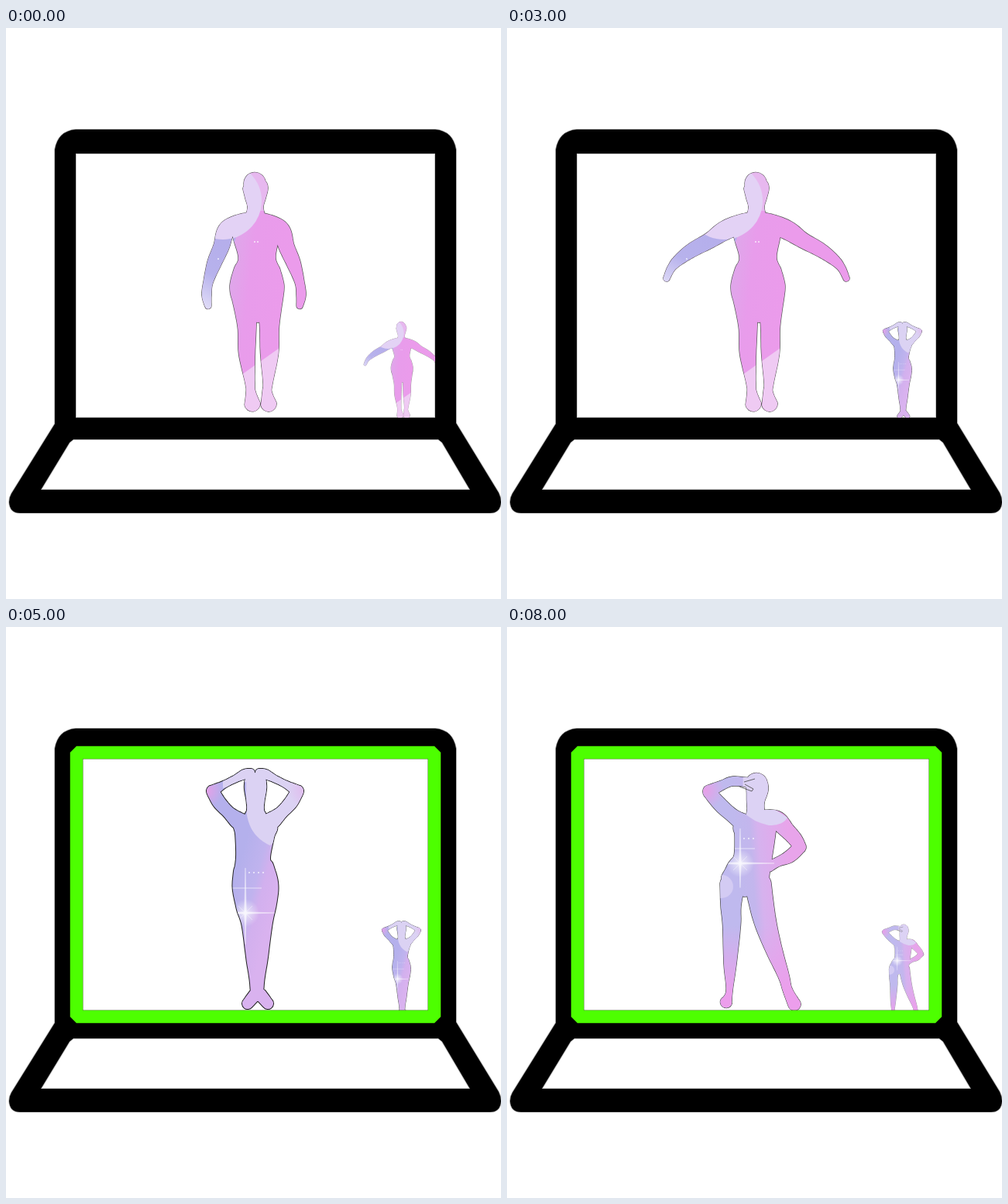
An HTML page that plays this animation: 639x737 px, repeating every 9 s.

```html
<!DOCTYPE html>
<html lang="en">
<head>
<meta charset="utf-8">
<style>
html, body { margin: 0; width: 100%; height: 100%; overflow: hidden; background: #fff; }
svg { display: block; }
</style>
</head>
<body>
<svg id="stage" width="639" height="737" viewBox="0 0 639 737"></svg>
<script>
// A limb is a few joints "x,y,radius"; its skin is swept along a spline through them.
const joints = text => text.trim().split(/\s+/).map(j => j.split(',').map(Number));
const mirror = (limb, axis) => limb.map(([x, y, r]) => [2 * axis - x, y, r]);
const pair = (text, axis) => [joints(text), mirror(joints(text), axis)];

function spline(pts, steps = 8) {
  const at = i => pts[Math.min(Math.max(i, 0), pts.length - 1)];
  const out = [];
  for (let n = 0; n <= (pts.length - 1) * steps; n++) {
    const i = Math.floor(n / steps), t = n / steps - i;
    const [a, b, c, d] = [at(i - 1), at(i), at(i + 1), at(i + 2)];
    out.push(b.map((v, k) => v + t / 2 * (c[k] - a[k] +
      t * (2 * a[k] - 5 * v + 4 * c[k] - d[k] + t * (3 * (v - c[k]) + d[k] - a[k])))));
  }
  return out;
}

function skin(limb) {
  const line = spline(limb), last = line.length - 1;
  const side = s => line.map(([x, y, r], i) => {
    const a = line[Math.max(i - 1, 0)], b = line[Math.min(i + 1, last)];
    const dir = Math.atan2(b[1] - a[1], b[0] - a[0]);
    return (x - s * r * Math.sin(dir)).toFixed(1) + ' ' + (y + s * r * Math.cos(dir)).toFixed(1);
  });
  const one = side(1), two = side(-1).reverse();
  const cap = (r, to) => `A${r} ${r} 0 0 0 ${to}`;
  return 'M' + one.join('L') + cap(line[last][2], two[0]) +
    'L' + two.join('L') + cap(line[0][2], one[0]) + 'Z';
}

const standing = [
  joints('321,200,14 322,207,16 322,220,13 322,232,10 322,245,14'),
  joints('322,240,10 322,252,28 323,268,30 324,296,24 324,312,30 324,335,35 325,356,29 325,372,8'),
  joints('308,345,17 311,385,12 311,420,10.5 315,458,6 316,470,6 318,485,10'),
  joints('341,345,17 340,385,12.5 340,420,11.5 338,458,6 337,470,6 339,485,10')
];
const lowered = [...standing,
  ...pair('318,247,10 298,254,12 284,262,11 278,282,10 269,303,9 261,328,6 259,345,6 261,359,4', 320)];
const spread = [...standing,
  ...pair('318,247,10 298,254,12 280,262,12 262,274,10 240,286,9 222,299,7 212,310,5 206,323,4', 322)];
const raised = [
  joints('322,202,14 322,210,14 322,225,11.5 322,236,11 322,245,14'),
  joints(`322,246,14 322,256,28 321,270,25 319,298,22 320,312,26 322,335,29.5 323,362,25.5
    324,385,19.5 324,430,13.5 324,455,9.5 324,474,8`),
  ...pair('312,256,12 300,250,11 287,239,8 275,226,8.5 267,212,8', 321.5),
  ...pair('266,212,7.5 282,203,4.5 296,196,4.5 308,190,6 316,188,5', 321.5),
  ...pair('322,474,8 312,486,7', 325)
];
const akimbo = [
  joints('322,202,14 323,210,14 321,224,11.5 321,236,11 321,246,13'),
  joints('322,246,13 320,256,27 320,270,26 317,300,24.5 311,318,29 308,332,31 307,340,8'),
  joints('310,256,13 292,244,9 276,230,9 261,213,8'),
  joints('261,212,8 278,204,6 292,199,6 314,201,6'),
  joints('325,247,10 347,249,12 361,262,10 372,274,9 378,284,8'),
  joints('378,284,8 365,296,8 350,303,6 338,309,7'),
  joints('291,332,16 289,360,13 290,385,11.5 288,435,8 287,470,4 283,484,7.5'),
  joints('324,332,17 332,375,14.5 343,412,11 357,450,7 362,468,6 371,487,8')
];

const fillAll = paint => `<path d="M190 170H450V500H190Z" fill="${paint}"/>`;
const disc = (x, y, r, paint, o = 1) => `<circle cx="${x}" cy="${y}" r="${r}" fill="${paint}" opacity="${o}"/>`;
const row = (x, y, n, gap) => Array.from({ length: n }, (_, i) => disc(x + i * gap, y, 1, '#fff', .8)).join('');
const star = (x, y, up, side) => disc(x, y, 18, 'url(#glow)', .7) +
  `<path d="M${x - 1.3} ${y}l1.3 ${-up}l1.3 ${up}l-1.3 ${up * .7}Z
    M${x} ${y - 1.3}l${side} 1.3l${-side} 1.3l${-side} -1.3Z
    M${x - 9} ${y - 9}l18 18m0 -18l-18 18" fill="#fff" stroke="#fff" stroke-width=".6" opacity=".65"/>`;

const pinkWash = fillAll('url(#pink)') +
  '<path d="M311 180H345V236H311Z" fill="#e7b8ef"/>' +
  '<path d="M190 284Q245 262 298 266L268 370H190Z" fill="url(#arm)"/>' +
  disc(280, 223, 50, '#e3d2f5') +
  '<path d="M295 454L360 408V500H295Z" fill="#efcaf3"/>' +
  row(321, 276, 2, 4) + row(232, 298, 2, 42);

const blueWash = fillAll('url(#blue)') +
  '<path d="M280 180H390V240L341 282Q310 268 310 230V200L280 208Z" fill="#dbd2f3"/>' +
  disc(258, 211, 22, 'url(#blush)') + disc(388, 210, 24, 'url(#blush)', .5) +
  '<path d="M292 337H330" stroke="#fff" opacity=".6"/>' +
  star(309, 369, 58, 38) + row(306, 286, 1) + row(314, 317, 4, 6);

const mixedWash = fillAll('url(#mixed)') +
  '<path d="M270 385H390V500H270Z" fill="url(#feet)"/>' +
  '<path d="M305 180H340V232L362 246Q357 256 338 256Q318 252 304 238Z" fill="#dcd2f4"/>' +
  disc(277, 335, 15, '#d3cbf3') + disc(256, 211, 24, 'url(#blush)') +
  '<path d="M290 286H320" stroke="#fff" opacity=".6"/>' +
  star(301, 305, 45, 44) + row(306, 273, 3, 6);

// Each pose: limbs, colouring, outline, placement of the thumbnail.
const poses = {
  lowered: [lowered, pinkWash, '#555', 1.4],
  spread: [spread, pinkWash, '#555', 1.4, [462, 379, 202, 186, .403]],
  raised: [raised, blueWash, '#222', 2, [485, 379, 258, 181, .4]],
  akimbo: [akimbo, mixedWash, '#444', 1.4, [484.5, 383.5, 253, 187, .4]]
};

const gradient = (id, coords, ...stops) =>
  `<linearGradient id="${id}" gradientUnits="userSpaceOnUse" ${coords}>` +
  stops.map(([o, c]) => `<stop offset="${o}" stop-color="${c}"/>`).join('') + '</linearGradient>';
const radial = (id, color) => `<radialGradient id="${id}"><stop stop-color="${color}"/>
  <stop offset="1" stop-color="${color}" stop-opacity="0"/></radialGradient>`;

let defs = gradient('pink', 'x1="285" y1="300" x2="365" y2="310"', [0, '#dcaaea'], [.4, '#e89ceb'], [1, '#eb9beb']) +
  gradient('arm', 'x1="275" y1="270" x2="235" y2="345"', [0, '#b5aeeb'], [.55, '#b7b2ec'], [1, '#dcd8f6']) +
  gradient('blue', 'x1="295" y1="330" x2="350" y2="345"', [0, '#b4b0ec'], [.45, '#c0b3ee'], [.65, '#d2b0ee'], [1, '#d9b2ef']) +
  gradient('mixed', 'x1="295" y1="300" x2="365" y2="295"', [0, '#bfb9ee'], [.3, '#c3b6ed'], [.45, '#d6b2ee'], [1, '#e8a4ea']) +
  gradient('feet', 'x1="0" y1="385" x2="0" y2="475"', [0, 'rgba(233,160,235,0)'], [1, '#ec9eec']) +
  radial('glow', '#fff') + radial('blush', '#e7a0e8') +
  '<clipPath id="screen"><path d="M90 162H554V503H90Z"/></clipPath>';
let big = '', small = '';

for (const [name, [limbs, wash, line, width, place]] of Object.entries(poses)) {
  const d = limbs.map(skin).join('');
  const fingers = name === 'akimbo' ? 'M300 206L316 212L318 209L307 203M306 200L320 196' : '';
  defs += `<clipPath id="clip-${name}"><path d="${d}"/></clipPath>
    <g id="${name}" fill="none" stroke="${line}">
      <path d="${d}" stroke-width="${width}"/>
      <g clip-path="url(#clip-${name})" stroke="none">${wash}</g>
      <path d="${fingers}" stroke-width=".8"/>
    </g>`;
  big += `<use id="big-${name}" href="#${name}"/>`;
  if (place) {
    const [x, y, x0, y0, s] = place;
    small += `<use id="small-${name}" href="#${name}"
      transform="translate(${x} ${y}) scale(${s}) translate(${-x0} ${-y0})"/>`;
  }
}

// The translucent stroke softens the laptop's edges.
document.getElementById('stage').innerHTML = `<defs>${defs}</defs>
  <path fill-rule="evenodd" stroke="#000" stroke-opacity=".3" stroke-width="1.6"
    d="M63 157Q67 133 90 131H554Q577 133 581 157V510L636 600Q639 606 639 612Q638 626 625 626H18
    Q5 626 4 612Q4 606 7 601L63 511Z M90 162V503H554V162Z M87 531L82 535L45 596H599L563 535L558 531Z"/>
  <g clip-path="url(#screen)">${big}${small}</g>
  <g id="match" fill="none" stroke-linejoin="bevel">
    <path d="M91 162H553V503H91Z" stroke="#2b7a00" stroke-width="17"/>
    <path d="M91 162H553V503H91Z" stroke="#4dff00" stroke-width="16"/>
  </g>`;

const order = Object.keys(poses);
const show = (id, opacity) => document.getElementById(id).setAttribute('opacity', opacity);

// Every round: hold for 1 s, dissolve in ten steps, then 1 s of green frame.
function draw(now) {
  const t = now % 9000, round = Math.floor(t / 3000), local = t % 3000;
  const step = Math.max(0, Math.floor((local - 1000) / 100) + 1);
  const mix = local >= 2000 ? 1 : step / 11;
  order.forEach((name, i) => {
    show('big-' + name, i === round ? 1 - mix : i === round + 1 ? mix : 0);
    if (i) show('small-' + name, i === round + 1 ? 1 : 0);
  });
  show('match', local >= 2000 ? 1 : 0);
}

const start = performance.now();
function tick() {
  draw(performance.now() - start);
  requestAnimationFrame(tick);
}
tick();
</script>
</body>
</html>
```
